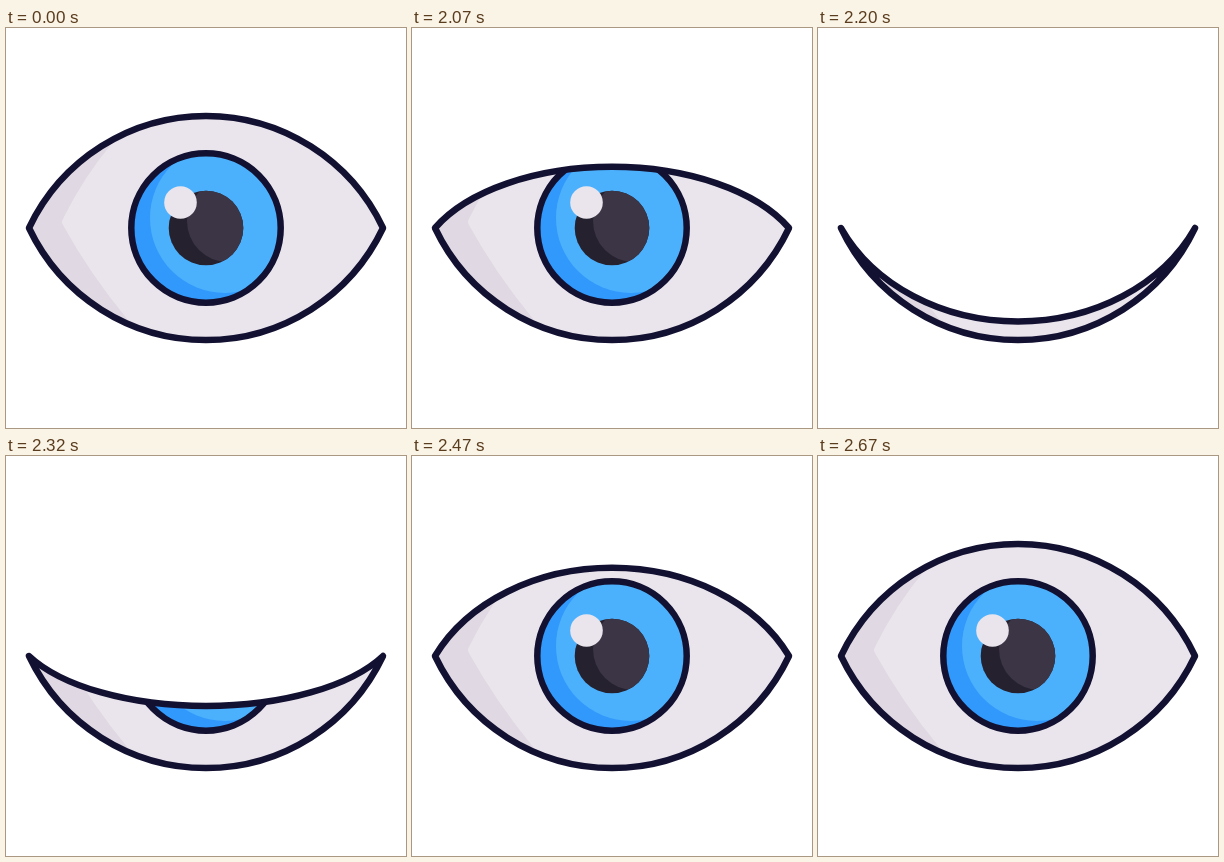
These frames come from a looping animation (400 px wide and 400 px high, 2700 ms). An HTML page:

```html
<!DOCTYPE html>
<html lang="en">
<head>
<meta charset="utf-8">
<title>Blinking eye</title>
<style>
  html, body { margin: 0; width: 100%; height: 100%; overflow: hidden; background: #fff; }
  svg { display: block; width: 100vw; height: 100vh; }
  .line { fill: none; stroke: #131132; stroke-width: 6.5; stroke-linejoin: round; }
</style>
</head>
<body>
<svg viewBox="0 0 400 400">
  <defs>
    <clipPath id="opening"><path id="eye"/></clipPath>
    <clipPath id="iris"><circle cx="200" cy="200" r="74.7"/></clipPath>
    <clipPath id="pupil"><circle cx="200" cy="200" r="37.3"/></clipPath>
  </defs>
  <g clip-path="url(#opening)">
    <rect width="400" height="400" fill="#eae5ec"/>
    <path fill="#e0d9e3" d="M0 80H130L107 114Q77 150 57 191Q55 194 57 197Q84 246 122 292L130 320H0Z"/>
    <g clip-path="url(#iris)">
      <rect x="120" y="120" width="160" height="160" fill="#3198fc"/>
      <circle cx="219" cy="190" r="75" fill="#4bb1fd"/>
    </g>
    <circle class="line" cx="200" cy="200" r="74.7"/>
    <g clip-path="url(#pupil)">
      <rect x="160" y="160" width="80" height="80" fill="#25212e"/>
      <circle cx="222" cy="193" r="41" fill="#3b3546"/>
    </g>
    <circle cx="174.5" cy="174.5" r="16.3" fill="#eae5ec"/>
  </g>
  <use href="#eye" class="line"/>
</svg>
<script>
  const LOOP = 2700, STEP = 25;
  const CLOSE = 2000, SHUT = 2243, OPEN = 2643;
  const eye = document.getElementById('eye');
  const mix = (a, b, k) => a + (b - a) * k;

  // Cubic bezier easing with control points (x1, 0) and (x2, 1).
  function ease(t, x1, x2) {
    let lo = 0, hi = 1, s = t;
    for (let i = 0; i < 24; i++) {
      s = (lo + hi) / 2;
      const x = 3 * (1 - s) ** 2 * s * x1 + 3 * (1 - s) * s * s * x2 + s ** 3;
      if (x < t) lo = s; else hi = s;
    }
    return s * s * (3 - 2 * s);
  }

  function closure(t) {
    if (t <= CLOSE || t >= OPEN) return 0;
    if (t < SHUT) return ease((t - CLOSE) / (SHUT - CLOSE), 1 / 3, 2 / 3);
    return 1 - ease((t - SHUT) / (OPEN - SHUT), 0.31, 0.11);
  }

  function draw(now) {
    // The motion advances 40 times a second, on 10 ms ticks.
    const tick = Math.floor((now % LOOP) / 10) * 10;
    const k = closure(Math.floor((tick + 5) / STEP) * STEP);
    const side = mix(131.6, 268.4, k).toFixed(2);
    const top = mix(88, 312, k).toFixed(2);
    eye.setAttribute('d',
      `M23 200C55.5 ${side} 124.3 ${top} 200 ${top}S344.5 ${side} 377 200` +
      'C344.5 268.4 275.7 312 200 312S55.5 268.4 23 200Z');
  }

  const start = performance.now();
  function loop() {
    draw(performance.now() - start);
    requestAnimationFrame(loop);
  }
  loop();
</script>
</body>
</html>
```
